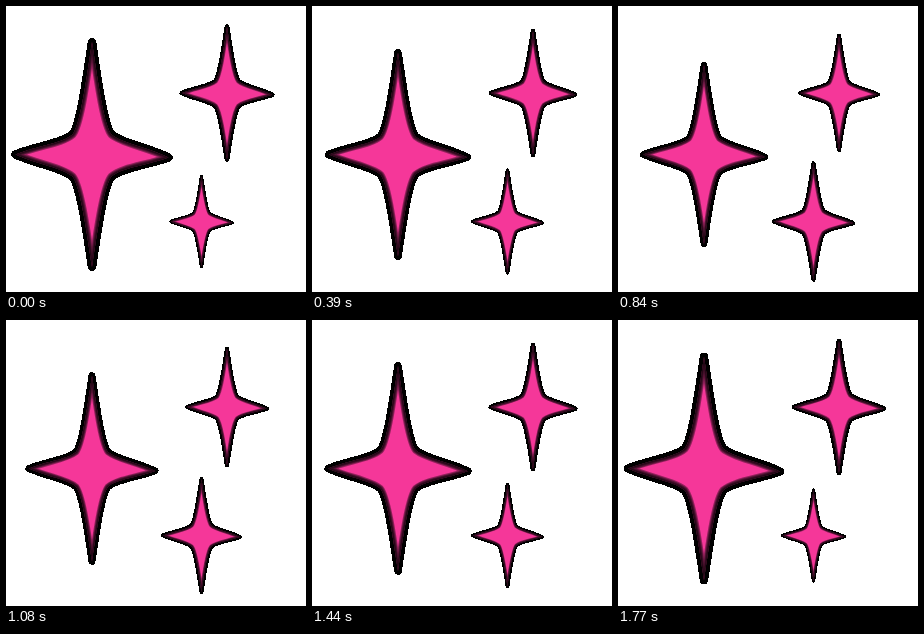
Recreate the animation shown at these times as an HTML page. Size 300 px wide and 286 px high, loop 1.8 s.

```html
<!DOCTYPE html>
<html lang="en">
<head>
<meta charset="utf-8">
<title>Sparkles</title>
<style>
  html, body { margin: 0; width: 100%; height: 100%; overflow: hidden; background: #fff; }
  svg { display: block; width: 300px; height: 286px; }
  .edge { stroke: #000; stroke-width: 8.5; stroke-linejoin: round; shape-rendering: crispEdges; }
  .core { fill: #f53799; }
  .shade { fill: none; stroke: #000; stroke-opacity: 0.4; }
</style>
</head>
<body>
<svg viewBox="0 0 300 286">
  <defs>
    <path id="shape" d="M0 -112.5 C6 -72 12 -29 19.5 -20 C30 -11 54 -8 76.5 3
      C54 11 30 13 19.5 22 C12 31 6 72 0 112.5 C-6 72 -12 31 -19.5 22
      C-30 13 -54 10 -76.5 0 C-54 -9 -30 -11 -19.5 -20 C-12 -29 -6 -72 0 -112.5Z"/>
    <clipPath id="inside"><use href="#shape"/></clipPath>
    <g id="star">
      <use href="#shape" class="edge"/>
      <use href="#shape" class="core"/>
      <g class="shade" clip-path="url(#inside)">
        <use href="#shape" stroke-width="2"/>
        <use href="#shape" stroke-width="4"/>
        <use href="#shape" stroke-width="6"/>
        <use href="#shape" stroke-width="8"/>
      </g>
    </g>
  </defs>
  <use href="#star"/>
  <use href="#star"/>
  <use href="#star"/>
</svg>
<script>
  const LOOP = 1800, STEP = 30;
  // Each star swings linearly between two sizes and back.
  const stars = [
    { x: 86, y: 148.5, from: 1, to: 0.78 },
    { x: 221, y: 87, from: 0.588, to: 0.5 },
    { x: 195.5, y: 215.5, from: 0.4, to: 0.525 }
  ];
  const nodes = document.querySelectorAll('svg > use');
  const start = performance.now();

  function draw(now) {
    const elapsed = Math.max(0, now - start) % LOOP;
    const t = Math.floor(elapsed / STEP) * STEP;
    const k = 1 - Math.abs(1 - t / (LOOP / 2));
    stars.forEach(({ x, y, from, to }, i) => {
      const size = from + (to - from) * k;
      nodes[i].setAttribute('transform', `translate(${x} ${y}) scale(${size})`);
    });
    requestAnimationFrame(draw);
  }
  draw(start);
</script>
</body>
</html>
```
